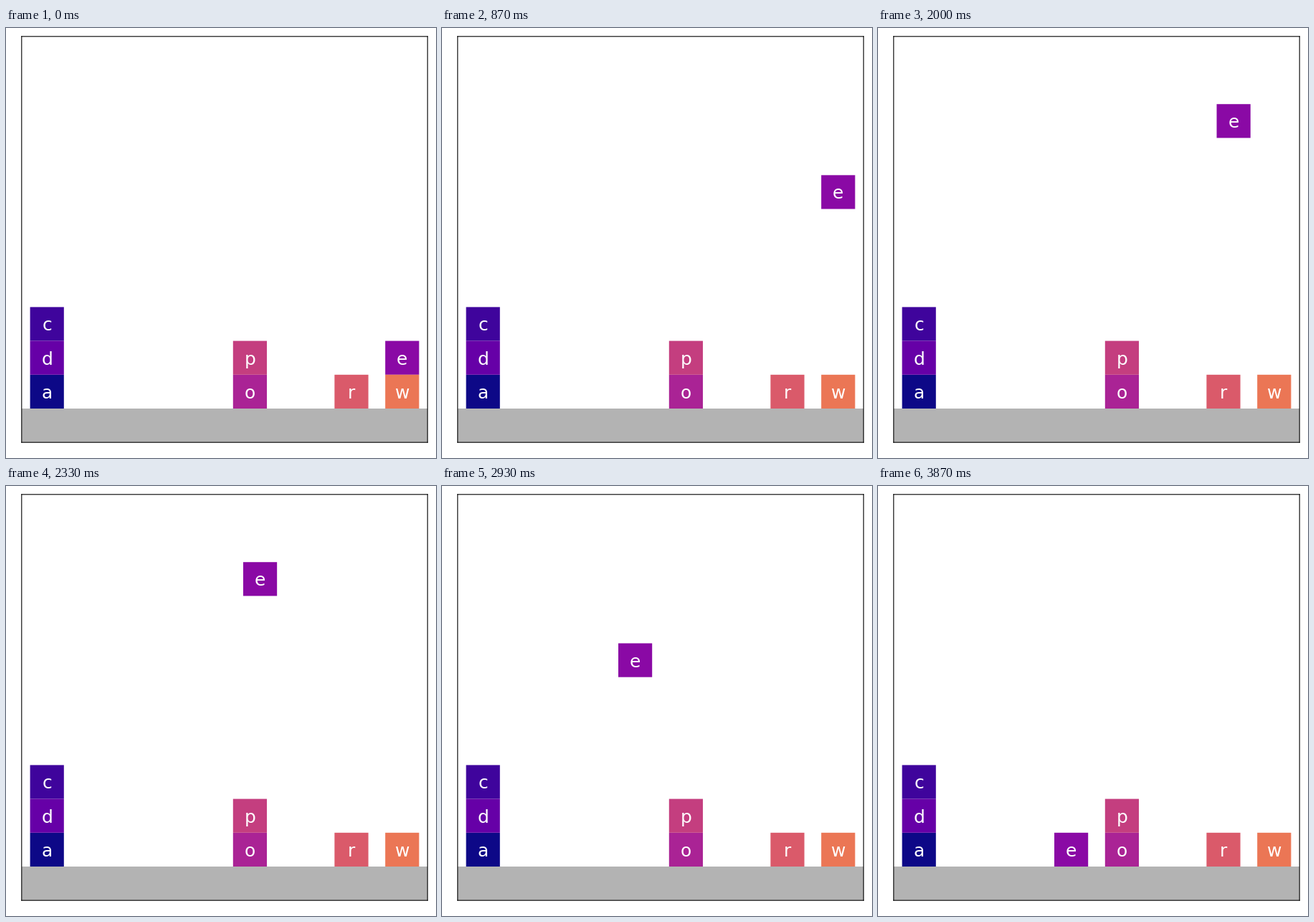
Recreate the animation shown at these times as a matplotlib script. Size 600 px wide and 600 px high, loop 4870 ms.

```python
import matplotlib.pyplot as plt
from matplotlib.animation import FuncAnimation
from matplotlib.patches import Rectangle

SIZE, DPI = 600, 100
UNIT = 47.2          # pixels per block
WORLD = 12           # world width and height in blocks
LEFT = BOTTOM = 21.8
LOOP_MS, TICK_MS = 4870, 10
STEPS_PER_SECOND = 15

LIFT_STEPS, SHIFT_STEPS, DROP_STEPS = 20, 10, 20
SHIFT_START = 29
DROP_START = SHIFT_START + SHIFT_STEPS
CARRY_HEIGHT = 9

# name -> (column, row)
BLOCKS = {
    "a": (0, 0), "c": (0, 2), "d": (0, 1), "e": (7, 1),
    "o": (4, 0), "p": (4, 1), "r": (6, 0), "w": (7, 0),
}
TARGET = (3, 0)

plt.rcParams["font.family"] = "DejaVu Sans"


def corner(column, row):
    return 0.25 + 1.5 * column, 1 + row


def phase(step, start, length):
    """Linear progress of a phase, clipped to 0..1."""
    return min(max((step - start + 1) / length, 0), 1)


def mix(a, b, t):
    return a + (b - a) * t


def carried_position(step):
    x0, y0 = corner(*BLOCKS["e"])
    x1, y1 = corner(*TARGET)
    # each action rests on its first step
    lift = phase(step, 0, LIFT_STEPS) if step > 0 else 0
    shift = phase(step, SHIFT_START, SHIFT_STEPS) if step > SHIFT_START else 0
    drop = phase(step, DROP_START, DROP_STEPS)
    y = mix(mix(y0, CARRY_HEIGHT, lift), y1, drop)
    return mix(x0, x1, shift), y


fig = plt.figure(figsize=(SIZE / DPI, SIZE / DPI), dpi=DPI, facecolor="white")
side = WORLD * UNIT / SIZE
ax = fig.add_axes([LEFT / SIZE, BOTTOM / SIZE, side, side])
ax.set(xlim=(0, WORLD), ylim=(0, WORLD), xticks=[], yticks=[])
for spine in ax.spines.values():
    spine.set_snap(False)


def add_box(x, y, width, color):
    box = Rectangle((x, y), width, 1, facecolor=color, linewidth=0, snap=False)
    return ax.add_patch(box)


add_box(0, 0, WORLD, "0.7")
boxes, labels = {}, {}
for i, (name, place) in enumerate(BLOCKS.items()):
    x, y = corner(*place)
    boxes[name] = add_box(x, y, 1, plt.cm.plasma(24 * i))
    labels[name] = ax.text(x + 0.5, y + 0.5, name, color="white", fontsize=18,
                           ha="center", va="center_baseline")


def update(tick):
    # steps start on the nearest tick
    step = int((tick + 0.5) * TICK_MS * STEPS_PER_SECOND / 1000)
    x, y = carried_position(step)
    boxes["e"].set_xy((x, y))
    labels["e"].set_position((x + 0.5, y + 0.5))
    return boxes["e"], labels["e"]


anim = FuncAnimation(fig, update, frames=LOOP_MS // TICK_MS, interval=TICK_MS,
                     repeat=True, repeat_delay=0, blit=False)
plt.show()
```
